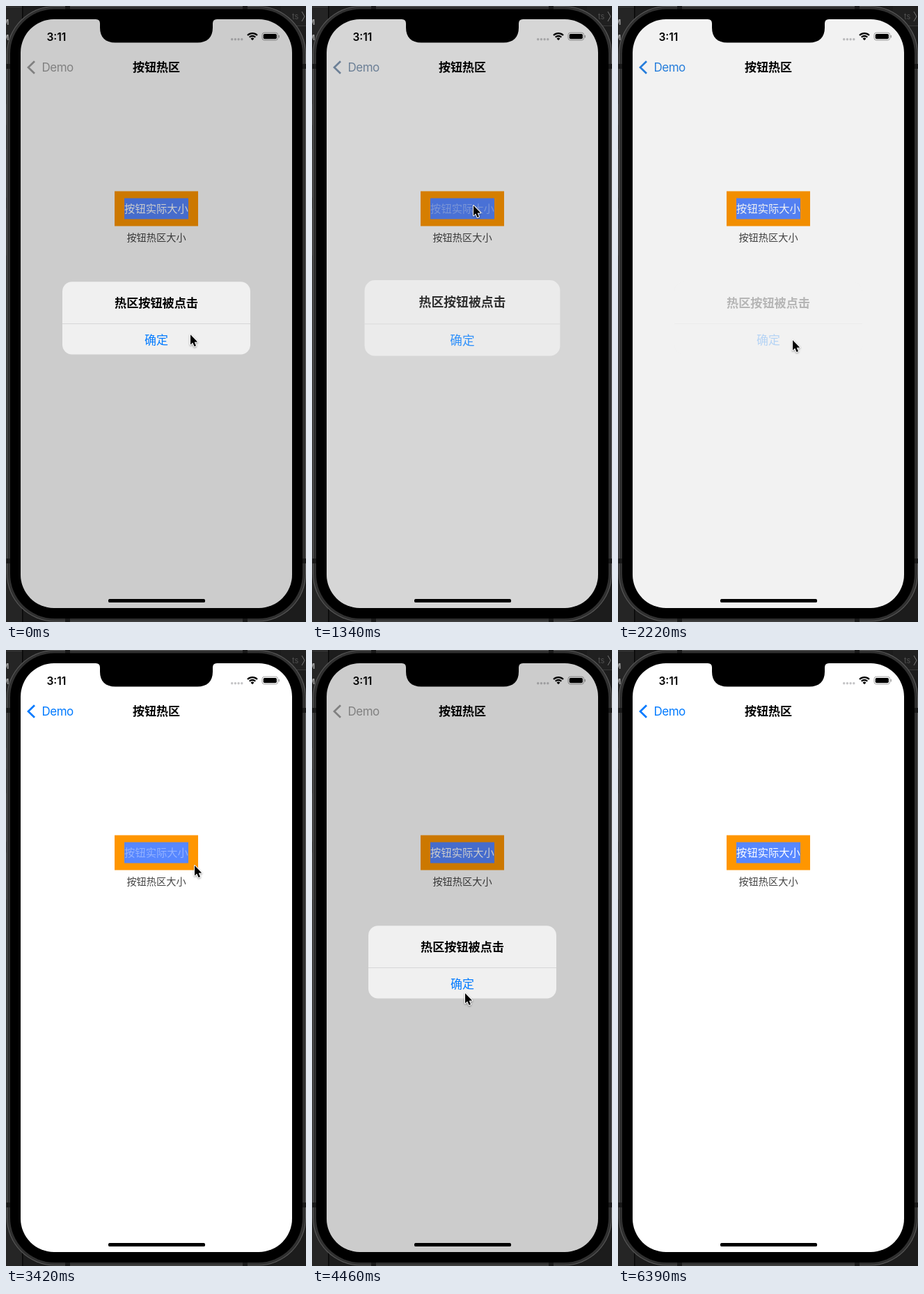
An HTML page with a canvas that plays this animation: 431x883 px, repeating every 6.53 s.

```html
<!DOCTYPE html>
<html lang="zh">
<head>
<meta charset="utf-8">
<title>按钮热区</title>
<style>
html, body { margin: 0; width: 100%; height: 100%; overflow: hidden; background: #1c1c1c; }
canvas { display: block; width: 431px; height: 883px; }
</style>
</head>
<body>
<canvas id="stage"></canvas>
<script>
const W = 431, H = 883, LOOP = 6530, STEP = 148.5, END = 43;
const CJK = '"Noto Sans CJK SC", "Noto Sans CJK", "Noto Sans CJK JP", sans-serif';
const LATIN = 'Inter, Roboto, sans-serif';
const canvas = document.getElementById('stage');
const ctx = canvas.getContext('2d');
const ratio = window.devicePixelRatio || 1;
canvas.width = W * ratio;
canvas.height = H * ratio;

// All times below are counted in steps.
const alerts = [
  { open: -9, start: 0.8, press: 1, close: 3 },
  { open: 9, start: 0.8, press: 14, close: 15 },
  { open: 25, start: 0.55, press: 33, close: 35 }
];
const pointerPath = [
  [0, 265, 471], [2, 265, 471], [3, 281, 420], [5, 248, 312], [7, 232, 286],
  [9, 232, 286], [12, 251, 479], [15, 251, 479], [17, 264, 385], [19, 271, 309],
  [25, 271, 309], [28, 236, 455], [30, 220, 492], [35, 220, 492], [40, 275, 400]
];

const mix = (a, b, k) => a + (b - a) * k;

function alertState(n) {
  const a = alerts.filter(x => x.open <= n).pop();
  const closing = n >= a.close;
  const p = closing
    ? 0.25 * 0.08 ** (n - a.close)
    : 1 - (1 - a.start) * 0.15 ** (n - a.open);
  return {
    p: p < 0.004 ? 0 : p,
    scale: closing ? 1 : 1 + 0.2 * (1 - p),
    pressed: n >= a.press && !closing
  };
}

// Opacity of the button caption while it is held down and released.
function captionAlpha(n) {
  for (const a of alerts) {
    if (n >= a.open - 2 && n <= a.open) return 0.36;
    if (n === a.open + 1) return 0.8;
  }
  return 1;
}

function pointerAt(n) {
  const i = pointerPath.findIndex(k => k[0] > n);
  if (i < 0) return pointerPath[pointerPath.length - 1].slice(1);
  const [n0, x0, y0] = pointerPath[i - 1], [n1, x1, y1] = pointerPath[i];
  const k = (n - n0) / (n1 - n0);
  return [mix(x0, x1, k), mix(y0, y1, k)];
}

function rect(x, y, w, h, color) {
  ctx.fillStyle = color;
  ctx.fillRect(x, y, w, h);
}

function round(x, y, w, h, r, color) {
  ctx.beginPath();
  ctx.roundRect(x, y, w, h, r);
  ctx.fillStyle = color;
  ctx.fill();
}

function text(s, x, y, font, color, align = 'center', spacing = 0) {
  ctx.font = font;
  ctx.textAlign = align;
  ctx.letterSpacing = spacing + 'px';
  ctx.fillStyle = color;
  ctx.fillText(s, x, y);
}

function polyline(points) {
  ctx.beginPath();
  points.forEach(([x, y]) => ctx.lineTo(x, y));
}

function drawBackdrop() {
  rect(0, 0, W, H, '#1c1c1c');
  rect(0, 0, 24, H, '#252525');
  rect(23, 0, 1.5, H, '#080808');
  rect(0, 1, 23, 1, '#3a3a3a');
  rect(395, 0, 36, 29, '#202020');
  rect(395, 28, 36, 1, '#383838');
  text('M', -6, 27, '700 11px ' + LATIN, '#a0a0a0', 'left');
  text('M', -6, 49, '700 11px ' + LATIN, '#a0a0a0', 'left');
  text('ts', 411, 19, '11px ' + LATIN, '#505050', 'left');
  ctx.strokeStyle = '#777';
  ctx.lineWidth = 1;
  polyline([[425, 8], [429, 15], [425, 22]]);
  ctx.stroke();
}

function drawBody() {
  round(0, 140, 4, 31, 1, '#303030');
  round(0, 205, 4, 70, 1, '#303030');
  round(0, 290, 4, 68, 1, '#303030');
  round(1, 0, 430, 882.5, 69, '#5c5c5c');
  round(2, 1, 428, 880.5, 68, '#303030');
  for (const x of [85, 340]) {
    rect(x, 0, 7, 6, '#191919');
    rect(x, 877, 7, 6, '#191919');
  }
  for (const y of [83, 792]) {
    rect(1, y, 6, 7, '#191919');
    rect(425, y, 6, 7, '#191919');
  }
  round(6, 4.5, 420, 873.5, 64, '#000');
}

function drawNotch() {
  ctx.beginPath();
  ctx.moveTo(129, 18);
  ctx.lineTo(129, 19);
  ctx.quadraticCurveTo(135, 19, 135, 25);
  ctx.lineTo(135, 31);
  ctx.bezierCurveTo(135, 45, 143, 52.5, 157, 52.5);
  ctx.lineTo(275, 52.5);
  ctx.bezierCurveTo(289, 52.5, 297, 45, 297, 31);
  ctx.lineTo(297, 25);
  ctx.quadraticCurveTo(297, 19, 303, 19);
  ctx.lineTo(303, 18);
  ctx.fillStyle = '#000';
  ctx.fill();
}

function drawStatus() {
  text('3:11', 58.5, 49.5, '600 15.5px ' + LATIN, '#000', 'left');
  for (let i = 0; i < 4; i++) round(323 + i * 4.7, 46, 3.4, 3.4, 1.7, '#c4c4c6');

  ctx.strokeStyle = '#000';
  ctx.lineWidth = 2.3;
  for (const r of [6, 9.9]) {
    ctx.beginPath();
    ctx.arc(354, 49, r, -Math.PI * 0.75, -Math.PI * 0.25);
    ctx.stroke();
  }
  ctx.beginPath();
  ctx.moveTo(354, 49.3);
  ctx.arc(354, 49.3, 3.5, -Math.PI * 0.75, -Math.PI * 0.25);
  ctx.fillStyle = '#000';
  ctx.fill();

  ctx.beginPath();
  ctx.roundRect(368, 38.2, 22.6, 10.8, 3.2);
  ctx.strokeStyle = '#a3a3a3';
  ctx.lineWidth = 1;
  ctx.stroke();
  round(369.7, 39.9, 19.2, 7.4, 1.8, '#000');
  round(391.6, 41.8, 1.4, 3.8, 0.7, '#a3a3a3');
}

function drawPage(n, p) {
  rect(21, 19, 390, 844, '#fff');
  drawStatus();

  const tint = `rgb(${mix(0, 160, p)}, ${mix(122, 160, p)}, ${mix(255, 160, p)})`;
  ctx.strokeStyle = tint;
  ctx.lineWidth = 2.7;
  polyline([[41, 79.2], [32, 88], [41, 96.8]]);
  ctx.stroke();
  text('Demo', 51.5, 94, '17px ' + LATIN, tint, 'left', -0.5);
  text('按钮热区', 216, 94.3, '600 17px ' + CJK, '#000');

  rect(156, 265.5, 120, 50, '#ff9600');
  rect(170, 275.5, 92, 30, '#5787ff');
  text('按钮实际大小', 216, 296.2, '15.3px ' + CJK, `rgba(255, 255, 255, ${captionAlpha(n)})`);
  text('按钮热区大小', 216, 336.5, '14.2px ' + CJK, '#444');
  round(147, 850, 139, 5, 2.5, '#000');

  rect(21, 19, 390, 844, `rgba(0, 0, 0, ${0.2 * p})`);
  round(147, 850, 139, 5, 2.5, '#000');
}

function drawAlert({ p, scale, pressed }) {
  if (!p) return;
  ctx.save();
  ctx.globalAlpha = p;
  ctx.translate(216, 447.3);
  ctx.scale(scale, scale);
  ctx.translate(-216, -447.3);
  round(81, 395.2, 270, 104.3, 14, '#f0f0f0');
  if (pressed) round(81, 456, 270, 43.5, [0, 0, 14, 14], '#e1e1e1');
  rect(81, 455, 270, 1, '#d6d6d7');
  text('热区按钮被点击', 216, 431.8, '600 17.15px ' + CJK, '#000');
  text('确定', 216, 484.6, '17px ' + CJK, '#007aff');
  ctx.restore();
}

function drawPointer(x, y) {
  ctx.save();
  ctx.translate(x, y);
  polyline([[0, 0], [0, 14.5], [3.2, 11.6], [5.6, 17], [8, 16], [5.7, 10.7], [10.2, 10.5]]);
  ctx.closePath();
  ctx.lineJoin = 'round';
  ctx.lineWidth = 2;
  ctx.strokeStyle = '#fff';
  ctx.shadowColor = 'rgba(0, 0, 0, 0.4)';
  ctx.shadowBlur = 2.5 * ratio;
  ctx.shadowOffsetY = ratio;
  ctx.stroke();
  ctx.shadowColor = 'transparent';
  ctx.fillStyle = '#000';
  ctx.fill();
  ctx.restore();
}

function draw(n) {
  const alert = alertState(n);
  ctx.setTransform(ratio, 0, 0, ratio, 0, 0);
  drawBackdrop();
  drawBody();
  ctx.save();
  ctx.beginPath();
  ctx.roundRect(21, 19, 390, 844, 48);
  ctx.clip();
  drawPage(n, alert.p);
  drawAlert(alert);
  ctx.restore();
  drawNotch();
  if (n < END) drawPointer(...pointerAt(n));
}

const begin = performance.now();
function tick() {
  const t = (performance.now() - begin) % LOOP;
  draw(Math.min(END, Math.floor((t + 10) / STEP)));
  requestAnimationFrame(tick);
}
tick();
</script>
</body>
</html>
```
